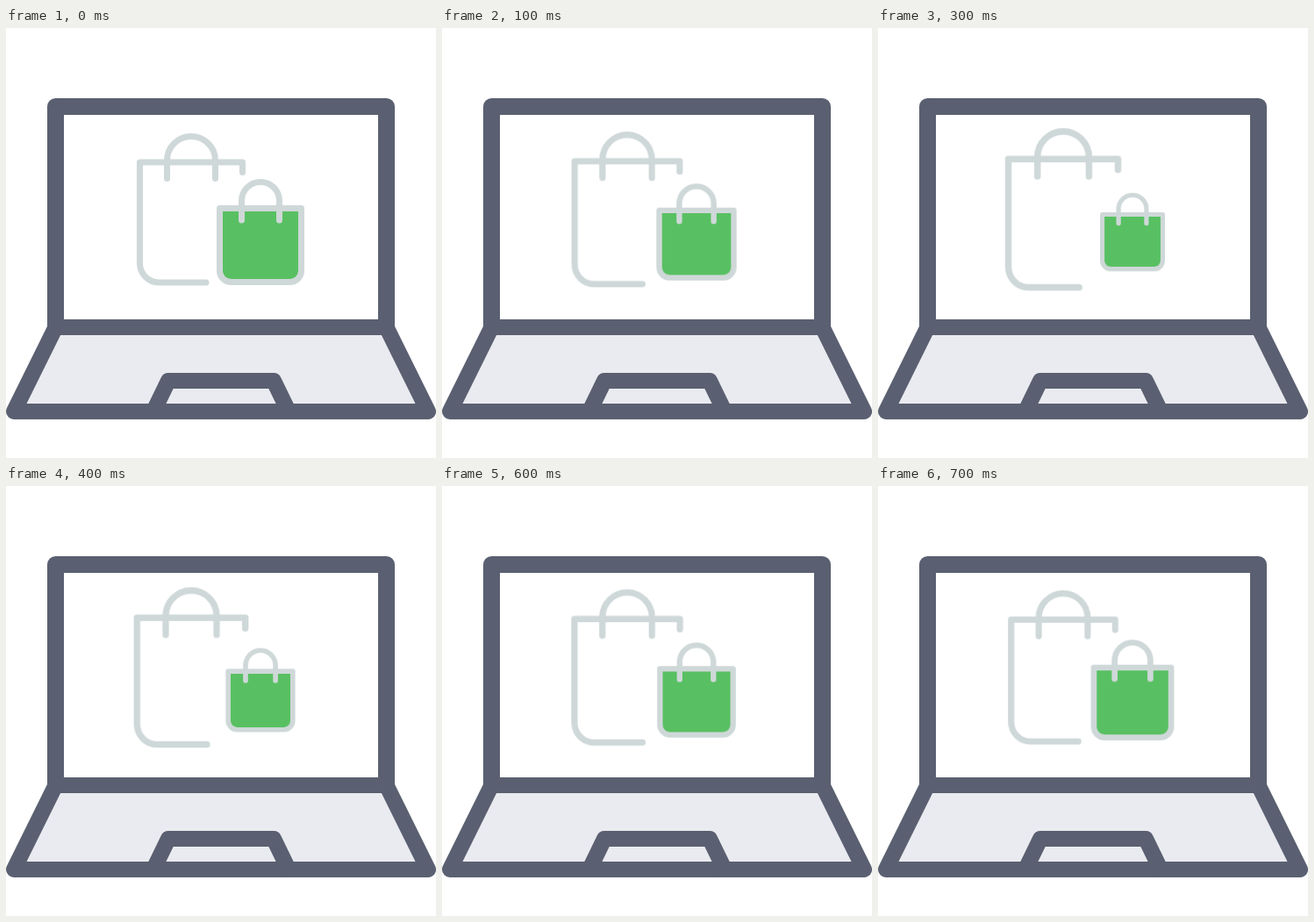
Recreate the animation shown at these times as an HTML page. Size 490 px wide and 490 px high, loop 800 ms.

```html
<!DOCTYPE html>
<html lang="en">
<head>
<meta charset="utf-8">
<title>Online shopping</title>
<style>
  html, body { margin: 0; width: 100%; height: 100%; overflow: hidden; background: #fff; }
  svg { display: block; width: 100vw; height: 100vh; }
  path { fill: none; stroke-linejoin: round; }
  .frame { stroke: #5a6071; stroke-width: 18; }
  .lid { stroke-width: 19; }
  .deck { fill: #eaebf0; }
  .bag { stroke: #cfd8d8; stroke-width: 7; stroke-linecap: round; }
  .bag .fill { fill: #58c062; }
  .large { transform-origin: 211px 206.5px; animation: grow .8s infinite; }
  .small { transform-origin: 290px 232.5px; animation: shrink .8s infinite; }

  /* three quick steps out, five slower steps back */
  @keyframes grow {
    0% { transform: scale(1); animation-timing-function: steps(3, end); }
    37.5% { transform: scale(1.068); animation-timing-function: steps(5, end); }
    100% { transform: scale(1); }
  }
  @keyframes shrink {
    0% { transform: scale(1); animation-timing-function: steps(3, end); }
    37.5% { transform: scale(.74); animation-timing-function: steps(5, end); }
    100% { transform: scale(1); }
  }
</style>
</head>
<body>
<svg viewBox="0 0 490 490">
  <path class="frame lid" d="M56.5 341V89.5H433.5V341"/>
  <path class="frame deck" d="M56.5 341H433.5L481 437H9Z"/>
  <path class="frame" d="M168 437L185 402H305L322 437"/>

  <g class="bag large">
    <path d="M269.5 164.5V153H152.5V268A21.5 22 0 0 0 174 290H228"/>
    <path d="M183.5 171.5V151A27.5 27.5 0 0 1 238.5 151V171.5"/>
  </g>

  <g class="bag small">
    <path class="fill" d="M243.5 205.5H336.5V276.5A13 13 0 0 1 323.5 289.5H256.5A13 13 0 0 1 243.5 276.5Z"/>
    <path d="M268.5 219V197A21.5 21.5 0 0 1 311.5 197V219"/>
  </g>
</svg>
</body>
</html>
```
